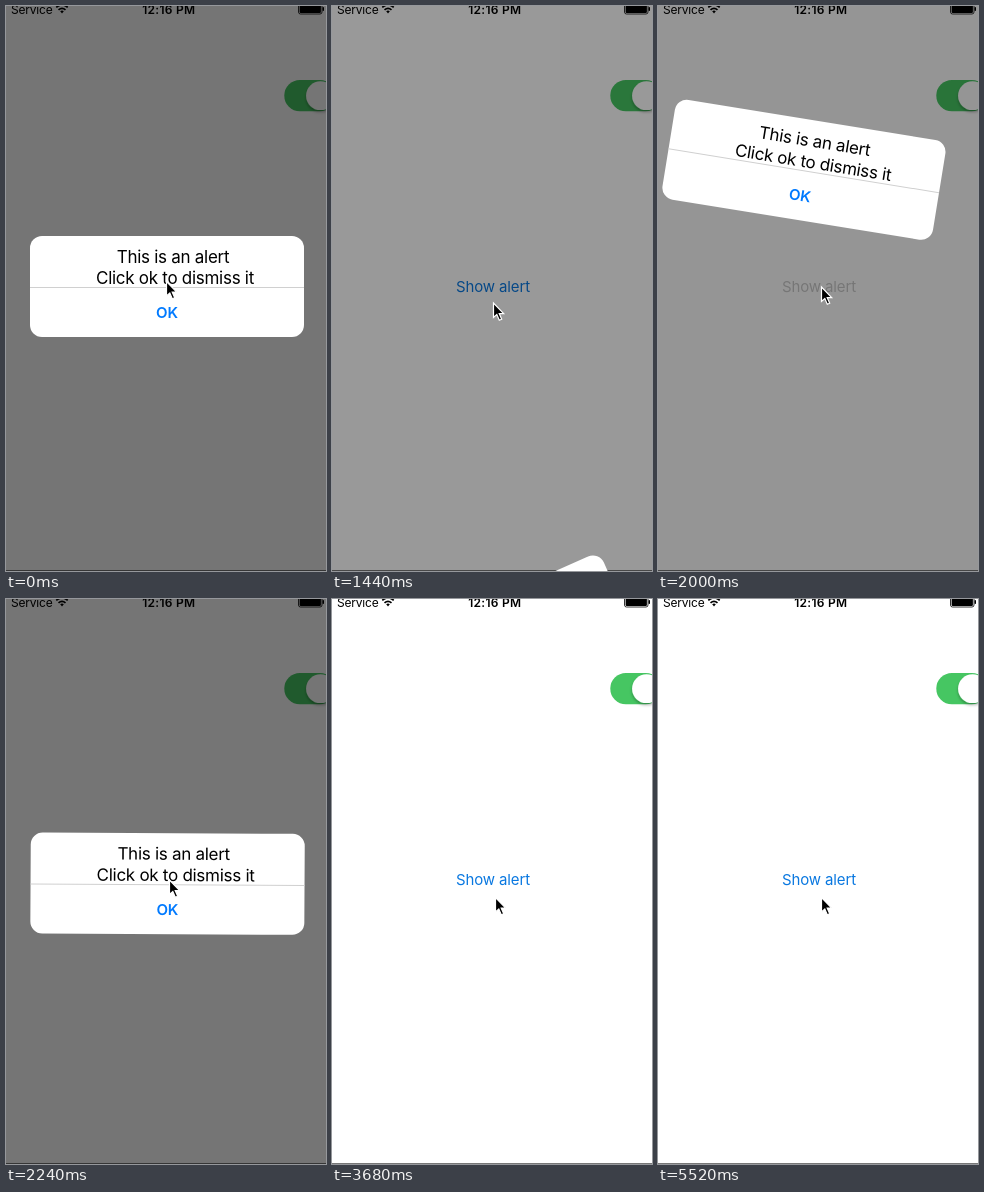
An HTML page for the animation above (5.6 s loop, 320 by 565 pixels).

```html
<!DOCTYPE html>
<html lang="en">
<head>
<meta charset="utf-8">
<title>Alert</title>
<style>
  html, body { margin: 0; width: 100%; height: 100%; overflow: hidden; background: #fff; }
  svg { display: block; width: 100%; height: 100%; }
  text { font-family: Inter, "Open Sans", sans-serif; }
  .status { font-size: 12px; }
  .message { font-size: 17px; letter-spacing: -.28px; text-anchor: middle; }
  .button { font-size: 15px; letter-spacing: -.12px; text-anchor: middle; }
</style>
</head>
<body>
<svg viewBox="0 0 320 565">
  <defs>
    <filter id="soft" x="-30%" y="-30%" width="160%" height="160%">
      <feDropShadow dx="0" dy="2" stdDeviation="1.5" flood-opacity=".3"/>
    </filter>
  </defs>

  <text class="status" x="5" y="8" letter-spacing="-.2">Service</text>
  <g fill="none" stroke="#000" stroke-width="1.7">
    <path d="M50.3 1.4Q56-3.6 61.7 1.4M52.5 3.9Q56 .9 59.5 3.9"/>
    <path d="M54.2 5.2Q56 4 57.8 5.2L56 7.5Z" fill="#000" stroke="none"/>
  </g>
  <text class="status" x="162.8" y="8" font-weight="600" text-anchor="middle" letter-spacing=".28">12:16 PM</text>
  <rect x="292.5" y="-3" width="23.5" height="11" rx="2" fill="none" stroke="#000" stroke-width=".8"/>
  <rect x="293.6" y="-3" width="21.3" height="9.9" rx="1"/>
  <rect x="316.5" y="1" width="1.5" height="4" rx=".7"/>

  <rect x="278.3" y="74" width="51" height="31.3" rx="15.6" fill="#46c662"/>
  <circle cx="314.5" cy="89.7" r="14.4" fill="#fff" filter="url(#soft)"/>
  <text class="button" id="show" x="161" y="286">Show alert</text>
  <rect y="564" width="320" height="1" fill="#777"/>

  <rect id="dim" width="320" height="565"/>

  <g id="alert">
    <rect x="-137" y="-50.5" width="274" height="101" rx="12" fill="#fff"/>
    <path d="M-137 1H137" stroke="#d0d0d0"/>
    <text class="message" x="6" y="-24">This is an alert</text>
    <text class="message" x="8" y="-2.7">Click ok to dismiss it</text>
    <text class="button" id="ok" y="31.4" font-weight="600" fill="#007aff">OK</text>
  </g>

  <path id="cursor" d="M0 0V14.5L3.3 11.5L5.8 17.3L8.2 16.3L5.7 10.6H10.2Z" stroke="#fff" stroke-width="1.2"/>
</svg>

<script>
const LOOP = 5600, STEP = 80;
const TAP = 1760, OPEN = 1840;          // "Show alert" pressed, alert enters
const FIRST_FALL = 1216, SECOND_FALL = 3370;
const PRESS_LEAD = 90, FADE_OUT = 310;
const FULL_DIM = .541;
const REST = { x: 161, y: 280.5, angle: 0 };

const byId = id => document.getElementById(id);
const [show, dim, alertBox, ok, cursor] = ['show', 'dim', 'alert', 'ok', 'cursor'].map(byId);

const ramp = (t, from, to) => Math.min(1, Math.max(0, (t - from) / (to - from)));
const smooth = u => u * u * (3 - 2 * u);
const place = (node, x, y, angle = 0) =>
  node.setAttribute('transform', `translate(${x} ${y}) rotate(${angle})`);

// Gravity pulls the alert down while it turns at a steady rate
const falling = s => ({
  x: REST.x + .006 * s,
  y: REST.y + .07 * s + .007 * s * s,
  angle: -.107 * s
});

// A damped spring snaps the alert into the centre
function snapping(s) {
  const offset = 463 * Math.exp(-.007 * s) * Math.cos(.0043 * s);
  return {
    x: REST.x - .129 * offset,
    y: REST.y - offset,
    angle: 17.7 * Math.exp(-((s / 198) ** 2))
  };
}

function render(t) {
  const reopened = t >= OPEN;
  const fallTime = t - (reopened ? SECOND_FALL : FIRST_FALL);
  const isFalling = fallTime > 0;

  const pose = isFalling ? falling(fallTime) : reopened ? snapping(t - OPEN) : REST;
  place(alertBox, pose.x, pose.y, pose.angle);
  ok.style.opacity = fallTime < -PRESS_LEAD ? 1 : .4;

  const fadeIn = t < FIRST_FALL ? 1 : smooth(ramp(t, TAP, TAP + 350));
  const gone = ramp(fallTime, 0, FADE_OUT);
  const fadeOut = 1 - .18 * gone - .82 * gone ** 5.6;
  dim.style.opacity = FULL_DIM * (isFalling && !reopened ? Math.max(fadeOut, fadeIn) : fadeIn * fadeOut);

  const pressed = t >= TAP && !reopened;
  show.setAttribute('fill', reopened && !isFalling ? '#c9c9c9' : pressed ? '#a6cdf5' : '#0a78e0');

  const toButton = ramp(t, 1600, TAP);
  place(cursor,
    160.5 + ramp(t, 640, 720) + 2 * toButton,
    275.5 + 21.5 * ramp(t, 240, 640) - 16 * toButton + 17.5 * ramp(t, 2400, 3040));
}

function frame() {
  render(Math.floor(performance.now() % LOOP / STEP) * STEP);
  requestAnimationFrame(frame);
}
frame();
</script>
</body>
</html>
```
